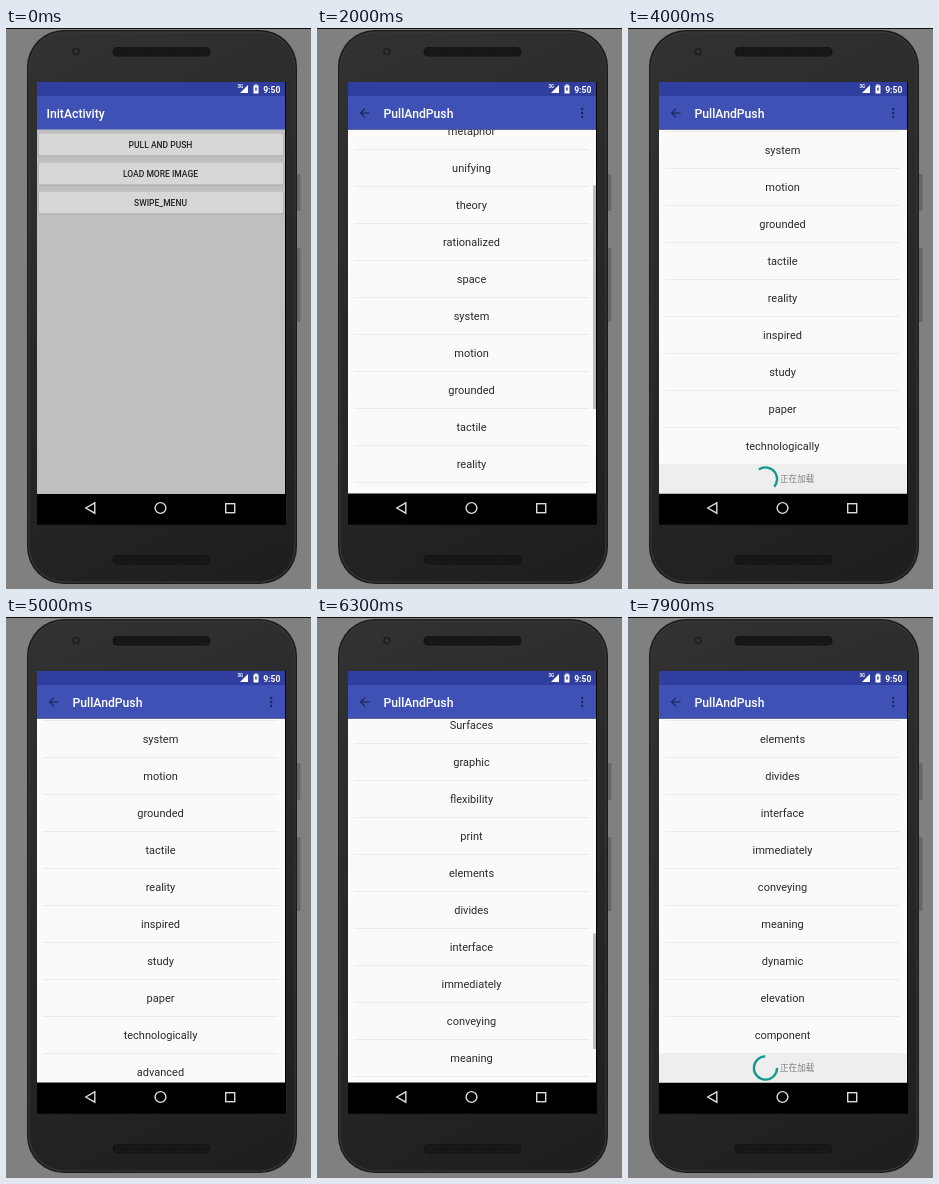
Animation of 305 by 561 pixels, one loop 8000 ms. Source, as an HTML page with a canvas:

```html
<!DOCTYPE html>
<html lang="en">
<head>
<meta charset="utf-8">
<style>
  html, body { margin: 0; width: 100%; height: 100%; overflow: hidden; background: #808080; }
  canvas { display: block; }
</style>
</head>
<body>
<canvas id="stage" width="305" height="561"></canvas>
<script>
const ctx = document.getElementById('stage').getContext('2d');
const LOOP = 8000, STEP = 100, OPEN = 800, LOADED = 4600;
const TOP = 101.5, VIEW = 364, HEADER = 120, ROW = 37, FOOTER = 29, MID = 154.5;
const words = ('material metaphor unifying theory rationalized space system motion grounded tactile ' +
  'reality inspired study paper technologically advanced imagination Surfaces graphic flexibility ' +
  'print elements divides interface immediately conveying meaning dynamic elevation component').split(' ');

// Each swipe glides to a stop; one with a pull overshoots late and springs back.
// A swipe without distance only flashes the scroll thumb.
const swipes = [
  { from: OPEN, time: 400 },
  { from: 1800, time: 665, dist: 340, pull: 12 },
  { from: LOADED - STEP, time: 200 },
  { from: 5200, time: 700, dist: 316 },
  { from: 6000, time: 1200, dist: 239, pull: 16 }
];
const loads = [{ from: 2400, to: LOADED, base: -42 }, { from: 7200, to: LOOP, base: -162 }];

const clamp = x => Math.min(1, Math.max(0, x));

function scrollAt(t) {
  return swipes.reduce((sum, { from, time, dist = 0, pull = 0 }) => {
    const x = clamp((t - from) / time);
    return sum + dist * (1 - (1 - x) ** 2) + pull * Math.sin(Math.PI * clamp(2 * x - 1));
  }, 0);
}

function thumbAlpha(t) {
  return Math.max(...swipes.map(s => t > s.from ? clamp(1 - (t - s.from - s.time) / 300) : 0));
}

// cubic-bezier(.4, 0, .2, 1)
function ease(x) {
  let lo = 0, hi = 1, s = 0;
  for (let i = 0; i < 20; i++) {
    s = (lo + hi) / 2;
    if (1.2 * s * (1 - s) ** 2 + 0.6 * s * s * (1 - s) + s ** 3 < clamp(x)) lo = s; else hi = s;
  }
  return 3 * s * s - 2 * s ** 3;
}

function rect(color, x, y, w, h) {
  ctx.fillStyle = color;
  ctx.fillRect(x, y, w, h);
}

function round(color, x, y, w, h, r) {
  ctx.beginPath();
  ctx.roundRect(x, y, w, h, r);
  ctx.fillStyle = color;
  ctx.fill();
}

function text(str, x, y, size, color, align = 'center', weight = 400) {
  ctx.font = `${weight} ${size}px Roboto, "Noto Sans CJK SC", "Noto Sans CJK", sans-serif`;
  ctx.textAlign = align;
  ctx.fillStyle = color;
  ctx.fillText(str, x, y);
}

function line(color, width, ...pts) {
  ctx.beginPath();
  pts.forEach(([x, y]) => ctx.lineTo(x, y));
  ctx.strokeStyle = color;
  ctx.lineWidth = width;
  ctx.stroke();
}

function arc(color, width, x, y, r, a = 0, b = 2 * Math.PI) {
  ctx.beginPath();
  ctx.arc(x, y, r, a, b);
  ctx.strokeStyle = color;
  ctx.lineWidth = width;
  ctx.stroke();
}

function speaker(y) {
  round('#151515', 106.5, y, 98, 9.5, 4.5);
  for (let x = 110; x < 202; x += 3)
    for (let r = 2; r < 8; r += 2.5) rect('#202020', x, y + r, 1.5, 1);
}

function drawPhone() {
  rect('#808080', 0, 0, 305, 561);
  rect('#111', 0, 0, 305, 1);
  round('#666', 290, 146, 4.5, 37, 1.5);
  round('#666', 290, 220, 4.5, 74, 1.5);
  const body = ctx.createLinearGradient(22, 2, 290, 555);
  body.addColorStop(0, '#323232');
  body.addColorStop(1, '#1e1e1e');
  round('#1c1c1c', 21, 2, 270, 554, 37);
  round('#3a3a3a', 22.5, 3.5, 267, 551, 36);
  round(body, 23.5, 4.5, 265, 549, 35);
  speaker(19);
  speaker(527);
  round('#222', 66, 19.5, 8, 8, 4);
  round('#3a3a3a', 68.5, 22, 3, 3, 1.5);
  rect('#000', 31, 54, 249, 442.5);
}

function drawBars(title, x) {
  rect('#303f9f', 31, 54, 248, 14);
  rect('#3f51b5', 31, 68, 248, 33.5);
  text(title, x, 89.5, 12.2, '#fff', 'left', 500);
}

function drawStatus() {
  text('3G', 231.5, 60, 4.5, '#fff', 'left', 700);
  ctx.beginPath();
  ctx.moveTo(242, 57);
  ctx.lineTo(242, 65);
  ctx.lineTo(234, 65);
  ctx.fillStyle = '#fff';
  ctx.fill();
  rect('#fff', 247.5, 57.5, 5, 8);
  rect('#fff', 248.5, 56.5, 3, 1);
  rect('#303f9f', 249.2, 59.5, 1.5, 3);
  text('9:50', 265.8, 64.5, 8.6, '#fff', 'center', 700);
}

function drawNav() {
  rect('#000', 31, 465.5, 248, 31);
  const c = '#dcdcdc';
  line(c, 1.4, [88.8, 474.8], [79.8, 480], [88.8, 485.2], [88.8, 474.1]);
  arc(c, 1.4, 154.5, 480, 5.4);
  ctx.strokeRect(219.7, 475.7, 9, 9);
}

function drawMenu() {
  rect('#bfbfbf', 31, 101, 248, 365);
  drawBars('InitActivity', 40.5);
  ['PULL AND PUSH', 'LOAD MORE IMAGE', 'SWIPE_MENU'].forEach((label, i) => {
    const y = 105.5 + i * 29;
    round('#a9a9a9', 32.5, y, 245, 23, 1.5);
    round('#d6d7d7', 33, y, 244, 22, 1.5);
    text(label, MID, y + 14, 8.5, '#222', 'center', 500);
  });
}

function drawSpinner(age, base, y) {
  const p = age / 1333 % 1, rad = Math.PI / 180;
  const tail = 270 * ease(2 * p - 1), head = 270 * ease(2 * p);
  const turn = base + 90 * p + age * 0.162;
  arc('#179a8c', 2.4, 137.5, y, 11.6, (turn + tail) * rad, (turn + Math.max(head, tail + 4)) * rad);
}

function drawFooter(t, y, pull) {
  rect('#eee', 31, y, 248, 60);
  const load = loads.find(l => t >= l.from && t < l.to);
  if (load) {
    drawSpinner(t - load.from, load.base, y + FOOTER / 2);
    text('正在加载', 152, y + 17.8, 8.6, '#808080', 'left');
  } else {
    text(pull > FOOTER ? '释放加载' : '上拉加载', MID, y + 17.8, 8.6, '#808080');
  }
}

const itemAt = s => s < HEADER ? s / HEADER : 1 + (s - HEADER) / ROW;

function drawList(t) {
  const count = t < LOADED ? words.length / 2 : words.length;
  const scroll = scrollAt(t);
  const inner = Math.min(scroll, HEADER + count * ROW - VIEW);
  const pull = scroll - inner;
  const start = TOP - scroll;

  rect('#fafafa', 31, TOP, 248, VIEW);
  ctx.save();
  ctx.beginPath();
  ctx.rect(31, TOP, 248, VIEW);
  ctx.clip();
  rect('#59894a', 31, start, 248, HEADER);
  text('广告位', MID, start + 64, 10.85, '#35522d');
  for (let i = 0; i < count; i++) {
    const y = start + HEADER + i * ROW;
    text(words[i], MID, y + 22, 11, '#2a2a2a');
    rect('#ececec', 37, Math.round(y + ROW) - 1, 235, 1);
  }
  if (pull > 0) drawFooter(t, start + HEADER + count * ROW, pull);

  const first = itemAt(inner), unit = VIEW / (count + 1);
  ctx.globalAlpha *= thumbAlpha(t);
  rect('rgba(0, 0, 0, .25)', 276, TOP + first * unit - pull, 3, (itemAt(inner + VIEW) - first) * unit);
  ctx.restore();
}

function drawActivity(t) {
  ctx.save();
  ctx.globalAlpha = t < 1000 ? 0.6 : 1;
  ctx.translate(0, 12 * (1 - clamp((t - OPEN) / 400)) ** 2);
  drawList(t);
  drawBars('PullAndPush', 66.5);
  const dark = '#1d2757';
  line(dark, 1.2, [52.5, 85], [43.5, 85]);
  line(dark, 1.2, [48, 80.6], [43.6, 85], [48, 89.4]);
  for (const y of [81, 85, 89]) round(dark, 264, y - 1.2, 2.4, 2.4, 1.2);
  ctx.restore();
}

function draw(t) {
  drawPhone();
  drawNav();
  if (t < 1000) drawMenu();
  if (t > OPEN) {
    rect('#303f9f', 31, 54, 248, 14);
    drawActivity(t);
  }
  drawStatus();
}

const begin = performance.now();
function tick() {
  const t = (performance.now() - begin) % LOOP;
  draw(Math.floor(t / STEP) * STEP);
  requestAnimationFrame(tick);
}
tick();
</script>
</body>
</html>
```
